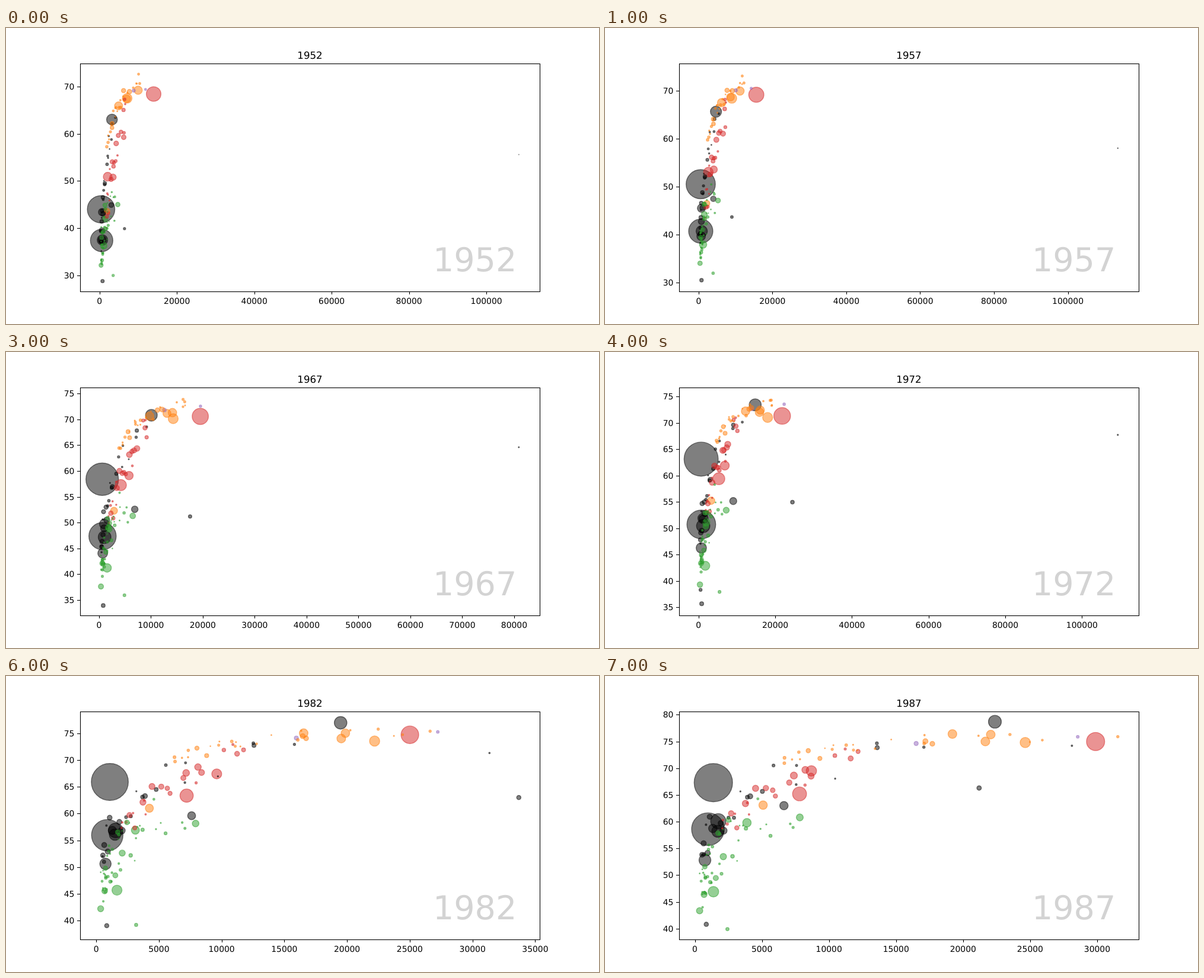
Recreate the animation shown at these times as an HTML page. Size 1000 by 500 pixels, loop 8000 ms.

```html
<!DOCTYPE html>
<html lang="en">
<head>
<meta charset="utf-8">
<title>Life expectancy by income</title>
<style>
  html, body { margin: 0; width: 100%; height: 100%; overflow: hidden; background: #fff; }
  svg { display: block; width: 100vw; height: 100vh; }
  text { font: 13.89px "DejaVu Sans", sans-serif; text-rendering: geometricPrecision; }
  .title { font-size: 16.67px; text-anchor: middle; }
  .mark { font-size: 55.56px; fill: #d3d3d3; text-anchor: end; }
  .x { text-anchor: middle; }
  .y { text-anchor: end; }
  .tick, .frame { stroke: #000; stroke-width: 1.1; fill: none; }
  circle { fill-opacity: .5; stroke-opacity: .5; stroke-width: 1.39; }
  .year { visibility: hidden; animation: show 8s step-end infinite; }
  @keyframes show {
    0% { visibility: visible; }
    12.5%, 100% { visibility: hidden; }
  }
</style>
</head>
<body>
<svg id="chart" viewBox="0 0 1000 500"></svg>
<script>
const ASIA = '#000', EUROPE = '#ff7f0e', AFRICA = '#2ca02c', AMERICAS = '#d62728', OCEANIA = '#9467bd';
const BOX = { x: 125, y: 60, w: 775, h: 385 };
const FIRST = 52, STEP = 5, YEARS = 8;

// Vertical data range per year; the income axis follows the richest bubble
const shortest = [28.8, 30.33, 32, 34.02, 35.4, 31.22, 38.45, 39.91];
const longest = [72.67, 73.47, 73.68, 74.16, 74.72, 76.11, 77.11, 78.67];
const POOREST = 385;

const bubbles = [];
const mix = (a, b, t) => a + (b - a) * t;
const grow = (a, b, t) => a * Math.pow(b / a, t);
const easeOut = (t, power) => 1 - Math.pow(1 - t, power);

// Leading bubbles pass through a few points: [year, income, life]
function lead(color, pop0, pop1, ...path) {
  bubbles.push({
    color,
    pop: t => mix(pop0, pop1, t),
    place(t) {
      const year = FIRST + t * STEP * (YEARS - 1);
      const k = Math.max(1, path.findIndex(p => p[0] >= year - .01));
      const a = path[k - 1], b = path[k], u = (year - a[0]) / (b[0] - a[0]);
      return [grow(a[1], b[1], u), mix(a[2], b[2], u)];
    }
  });
}

lead(ASIA, 556, 1084, [52, 400, 44], [57, 576, 50.5], [62, 488, 44.5], [67, 613, 58.4], [72, 677, 63.1], [87, 1379, 67.3]);
lead(ASIA, 372, 788, [52, 547, 37.4], [72, 724, 50.7], [87, 977, 58.6]);
lead(ASIA, 86.5, 122, [52, 3217, 63], [72, 14779, 73.4], [87, 22376, 78.7]);
lead(ASIA, 82, 169, [52, 750, 37.5], [87, 1748, 60.1]);
lead(ASIA, 46.9, 104, [52, 684, 37.5], [87, 752, 52.8]);
lead(ASIA, 41.3, 105, [52, 685, 43.4], [87, 1705, 58.2]);
lead(ASIA, 17.3, 51.9, [52, 3035, 44.9], [77, 11889, 57.7], [82, 7608, 59.6], [87, 6643, 63]);
lead(ASIA, 8.4, 13.9, [52, 779, 28.8], [87, 852, 40.8]);
lead(ASIA, 4.7, 8.4, [52, 368, 39.4], [67, 523, 45.4], [77, 525, 31.2], [82, 624, 51], [87, 684, 53.9]);
lead(ASIA, 4, 14.6, [52, 6460, 39.9], [77, 34168, 58.7], [82, 33693, 63], [87, 21198, 66.3]);
lead(ASIA, .1, 1.9, [52, 108382, 55.6], [57, 113523, 58], [62, 95458, 60.5], [67, 80895, 64.6],
  [72, 109348, 67.7], [77, 59265, 69.3], [82, 31354, 71.3], [87, 28118, 74.2]);
lead(AMERICAS, 157.6, 242.8, [52, 13990, 68.4], [72, 21806, 71.3], [82, 25009, 74.7], [87, 29884, 75]);
lead(AMERICAS, 56.6, 142.9, [52, 2109, 50.9], [77, 6660, 61.5], [87, 7807, 65.2]);
lead(AMERICAS, 30.1, 80.1, [52, 3478, 50.8], [82, 9611, 67.4], [87, 8688, 69.5]);
lead(AFRICA, 33, 82, [52, 1077, 36.3], [77, 1982, 44.5], [87, 1385, 46.9]);
lead(AFRICA, 22.2, 52.8, [52, 1419, 41.9], [72, 2024, 51.1], [87, 3885, 59.8]);
lead(AFRICA, 14.3, 35.9, [52, 4725, 45], [77, 8028, 55.5], [87, 7826, 60.8]);
lead(AFRICA, 4.2, 7.9, [52, 3521, 30], [72, 5473, 37.9], [87, 2430, 39.9]);
lead(EUROPE, 69.1, 77.7, [52, 7144, 67.5], [72, 18016, 71], [87, 24639, 74.8]);
lead(EUROPE, 50.4, 57, [52, 9980, 69.2], [72, 15895, 72], [87, 21665, 75]);
lead(EUROPE, 47.7, 56.7, [52, 4931, 65.9], [72, 12269, 72.2], [87, 19207, 76.4]);
lead(EUROPE, 42.5, 55.6, [52, 7030, 67.4], [72, 16107, 72.4], [87, 22066, 76.3]);
lead(EUROPE, 22.2, 52.9, [52, 1969, 43.6], [82, 4241, 61], [87, 5089, 63.1]);
lead(EUROPE, 3.3, 4.2, [52, 10095, 72.6], [72, 18965, 74.3], [87, 31541, 75.9]);

let seed = 41;
const rnd = (lo, hi) => {
  seed = (seed * 16807) % 2147483647;
  return mix(lo, hi, seed / 2147483647);
};

// A region's crowd climbs one curve: each range runs from its poorest to its richest member
function crowd(color, count, { skew, income, gain, early, late, pop, swell, spread }) {
  for (let i = 0; i < count; i++) {
    const rank = Math.pow((i + .5) / count, skew);
    const start = grow(...income, rank) * rnd(.85, 1.15);
    const end = start * mix(...gain, rank) * rnd(.8, 1.2);
    const young = mix(...early, rank) + rnd(-spread, spread);
    const old = mix(...late, rank) + rnd(-spread, spread);
    const people = grow(...pop, rnd(0, 1));
    bubbles.push({
      color,
      pop: t => mix(people, people * swell, t),
      place: t => [grow(start, end, easeOut(t, 1.5)), mix(young, old, easeOut(t, 1.2))]
    });
  }
}

crowd(OCEANIA, 2, { skew: 1, income: [10400, 10400], gain: [1.9, 2.1], early: [69, 69.5], late: [74, 76.5], pop: [2, 9], swell: 1.8, spread: 0 });
crowd(ASIA, 22, { skew: 1.2, income: [420, 4300], gain: [1.2, 4.2], early: [37, 63], late: [54, 75.5], pop: [.5, 26], swell: 2.2, spread: 2.5 });
crowd(AMERICAS, 22, { skew: 1, income: [1600, 7800], gain: [1.3, 1.7], early: [41, 66], late: [58, 74], pop: [.8, 17], swell: 2.2, spread: 2 });
crowd(AFRICA, 47, { skew: 1.5, income: [430, 4200], gain: [1.1, 1.7], early: [35, 46], late: [47, 62], pop: [.2, 14], swell: 2.4, spread: 4.5 });
crowd(EUROPE, 24, { skew: .75, income: [1700, 9500], gain: [3.2, 2.5], early: [57, 71], late: [71, 76], pop: [.4, 28], swell: 1.25, spread: 1.2 });

function el(parent, name, attrs, text) {
  const node = document.createElementNS('http://www.w3.org/2000/svg', name);
  for (const key in attrs) node.setAttribute(key, attrs[key]);
  if (text !== undefined) node.textContent = text;
  return parent.appendChild(node);
}

// Maps a data range to pixels with a 5% margin and picks round ticks, at most nine intervals
function scale(min, max, from, to) {
  const pad = (max - min) * .05, lo = min - pad, hi = max + pad;
  const raw = (hi - lo) / 9, base = 10 ** Math.floor(Math.log10(raw));
  const step = base * [1, 2, 2.5, 5, 10].find(n => n * base >= raw);
  const ticks = [];
  for (let v = Math.ceil(lo / step) * step; v <= hi; v += step) ticks.push(v);
  return { ticks, px: v => mix(from, to, (v - lo) / (hi - lo)) };
}

function drawYear(svg, i) {
  const t = i / (YEARS - 1), bottom = BOX.y + BOX.h;
  const dots = bubbles.map(b => ({ color: b.color, pop: b.pop(t), at: b.place(t) }));
  const richest = Math.max(...dots.map(d => d.at[0]));
  const xs = scale(POOREST, richest, BOX.x, BOX.x + BOX.w);
  const ys = scale(shortest[i], longest[i], bottom, BOX.y);
  const g = el(svg, 'g', { class: 'year', style: `animation-delay:${i - YEARS}s` });

  for (const d of dots) {
    el(g, 'circle', {
      cx: xs.px(d.at[0]).toFixed(2),
      cy: ys.px(d.at[1]).toFixed(2),
      r: (.982 * Math.sqrt(d.pop)).toFixed(2),
      fill: d.color, stroke: d.color
    });
  }
  for (const v of xs.ticks) {
    const x = xs.px(v);
    el(g, 'path', { class: 'tick', d: `M${Math.round(x) + .5} ${bottom}v5` });
    el(g, 'text', { class: 'x', x, y: bottom + 21 }, v);
  }
  for (const v of ys.ticks) {
    const y = Math.round(ys.px(v));
    el(g, 'path', { class: 'tick', d: `M${BOX.x} ${y + .5}h-5` });
    el(g, 'text', { class: 'y', x: 115.3, y: y + 5 }, v);
  }
  const year = 1900 + FIRST + i * STEP;
  el(g, 'text', { class: 'title', x: 512.5, y: 52 }, year);
  el(g, 'text', { class: 'mark', x: 861.25, y: 411 }, year);
}

const chart = document.getElementById('chart');
for (let i = 0; i < YEARS; i++) drawYear(chart, i);
el(chart, 'rect', { class: 'frame', x: BOX.x + .5, y: BOX.y + .5, width: BOX.w, height: BOX.h });
</script>
</body>
</html>
```
